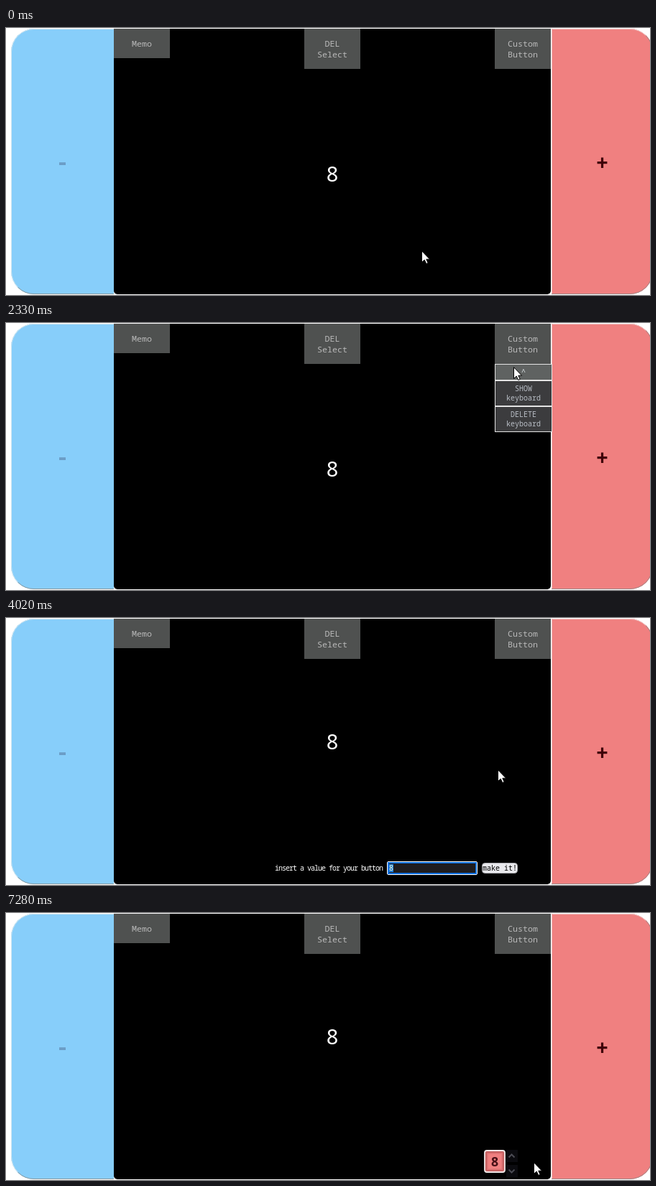
An HTML page that plays this animation: 896 by 372 pixels, repeating every 8 s.

```html
<!DOCTYPE html>
<html lang="en">
<head>
<meta charset="utf-8">
<title>Counter</title>
<style>
  html, body { margin: 0; width: 100%; height: 100%; overflow: hidden; background: #fff; }
  svg { display: block; width: 100vw; height: 100vh; }
  text { font: 10px "Noto Sans Mono", "DejaVu Sans Mono", monospace; text-anchor: middle; white-space: pre; }
  .tab rect { fill: #4f5150; }
  .tab text { font-size: 11.67px; fill: #bababa; }
  .menu rect { fill: #3c3c3e; stroke: #e4e4e4; }
  .menu text { fill: #b9bec6; }
  .menu #newBox.on { fill: #5f6261; }
  #newText { fill: #9dbacb; }
  #newText.on { fill: #dde3e6; }
  #count { font-size: 29.3px; fill: #fff; }
  .sign { font-size: 30px; font-weight: 700; }
  .label { text-anchor: start; letter-spacing: -1px; fill: #fff; }
  .value { text-anchor: start; fill: #fff8c4; }
  #make { fill: #e9e9ed; stroke: #a9a9ae; }
  #make.on { fill: #d0d0d7; }
  .close rect { fill: #202020; }
  .close text { fill: #fff; }
  .close.on text { fill: #f08080; }
  .key text { font-size: 18.5px; font-weight: 600; fill: #7a1420; }
  .key .shade { fill: none; stroke: #400; stroke-opacity: .22; }
  .key.calm text { fill: #481016; }
  .key.calm .shade { stroke-opacity: .12; }
  .arrows rect { fill: #0b0b0f; }
  .arrows path { fill: none; stroke: #4b4b53; stroke-width: 2; }
</style>
</head>
<body>
<svg viewBox="0 0 896 372" preserveAspectRatio="none">
  <defs>
    <g id="pill">
      <rect x="720" y="326" width="38" height="45" rx="17"/>
      <text x="739" y="352">x</text>
    </g>
  </defs>

  <path d="M150 1H39A32 32 0 0 0 7 33V339A32 32 0 0 0 39 371H150Z" fill="#87cefa"/>
  <path d="M150 1.5H39A31.5 31.5 0 0 0 7.5 33V339A31.5 31.5 0 0 0 16.7 361.3" fill="none" stroke="#d3e6ef"/>
  <path d="M16.7 361.3A31.5 31.5 0 0 0 39 370.5H150" fill="none" stroke="#87999f"/>
  <text class="sign" x="78.5" y="196.5" fill="#6b9dc6">-</text>

  <path d="M759 1H868A32 32 0 0 1 900 33V339A32 32 0 0 1 868 371H759Z" fill="#f08080"/>
  <path d="M759.5 371V1.5H868A31.5 31.5 0 0 1 890.3 10.7" fill="none" stroke="#efc4c4"/>
  <path d="M890.3 10.7A31.5 31.5 0 0 1 899.5 33V339A31.5 31.5 0 0 1 868 370.5H759" fill="none" stroke="#a08585"/>
  <text class="sign" x="829.5" y="199" fill="#400008">+</text>

  <rect x="150" y="1" width="608" height="370" rx="5"/>
  <g class="tab">
    <rect x="150" y="1" width="78" height="41"/>
    <text x="189" y="26">Memo</text>
    <rect x="415" y="1" width="78" height="56"/>
    <text x="454" y="26">DEL</text>
    <text x="454" y="41">Select</text>
    <rect x="680" y="1" width="78" height="56"/>
    <text x="719" y="26">Custom</text>
    <text x="719" y="41">Button</text>
  </g>

  <text id="count" x="454" y="213.5">8</text>

  <g id="menu" class="menu">
    <rect id="newBox" x="680.5" y="57.5" width="79" height="22"/>
    <text id="newText" x="720" y="72">NEW BUTTON</text>
    <rect x="680.5" y="80.5" width="79" height="35"/>
    <text x="720" y="95">SHOW</text>
    <text x="720" y="108">keyboard</text>
    <rect x="680.5" y="116.5" width="79" height="35"/>
    <text x="720" y="131">DELETE</text>
    <text x="720" y="144">keyboard</text>
  </g>

  <g id="form">
    <text class="label" x="374" y="352">insert a value for your button</text>
    <rect x="532.5" y="341.5" width="121" height="14" fill="#1e1c1e" stroke="#eee"/>
    <g id="focus">
      <rect x="530.5" y="339.5" width="125" height="18" rx="1.5" fill="#1e1c1e" stroke="#fff"/>
      <rect x="532" y="341" width="122" height="15" fill="none" stroke="#1070e0" stroke-width="2"/>
      <rect x="533" y="343" width="6" height="11" fill="#1b7fdc"/>
    </g>
    <text class="value" x="533" y="352">8</text>
    <rect id="make" x="662.5" y="341.5" width="49" height="14" rx="4"/>
    <text x="687" y="352">make it!</text>
    <g class="close"><use href="#pill"/></g>
  </g>

  <g id="row">
    <g id="key" class="key">
      <rect x="666" y="331" width="28" height="30" rx="3" fill="#f08080"/>
      <rect class="shade" x="668" y="333" width="24" height="26" rx="2" stroke-width="5"/>
      <rect class="shade" x="667.5" y="332.5" width="25" height="27" rx="2" stroke-width="3"/>
      <rect x="666" y="331" width="28" height="30" rx="3" fill="none" stroke="#f1e8e8" stroke-width="1.8"/>
      <text x="680" y="353">8</text>
    </g>
    <g class="arrows">
      <rect x="696" y="330" width="16" height="17"/>
      <rect x="696" y="351" width="16" height="17"/>
      <path d="M699.5 340.5L703.5 336.5L707.5 340.5M699.5 357.5L703.5 361.5L707.5 357.5"/>
    </g>
    <g id="rowClose" class="close"><use href="#pill"/></g>
  </g>

  <path id="cursor" d="M.5 .7V16.5L4.2 13L6.8 18.5L9.2 17.4L6.8 12.2H11.6Z" fill="#fff" stroke="#000"/>
</svg>
<script>
const LOOP = 8000, TICK = 70;
const $ = id => document.getElementById(id);
const easeIn = p => p * p;
const easeOut = p => p * (2 - p);
const easeBoth = p => p * p * (3 - 2 * p);

// start time, ticks, target x, target y, easing
const moves = [
  [810, 12, 706, 44, easeBoth],
  [1910, 9, 706, 64, easeBoth],
  [3670, 6, 684, 211, easeIn],
  [4090, 6, 670, 334, easeOut],
  [4520, 7, 671, 345, easeOut],
  [6790, 8, 734, 347, easeBoth]
];

function pointer(t) {
  let x = 578, y = 310;
  for (const [start, ticks, toX, toY, ease] of moves) {
    if (t < start) break;
    const p = ease(Math.min(1, (Math.floor((t - start) / TICK) + 1) / ticks));
    x += (toX - x) * p;
    y += (toY - y) * p;
  }
  return [Math.round(x), Math.round(y)];
}

const show = (id, on) => $(id).style.display = on ? "" : "none";
const mark = (id, on) => $(id).classList.toggle("on", on);

function draw(t) {
  const [x, y] = pointer(t);
  const formOpen = t >= 2940 && t < 7280;
  const made = t >= 4940;
  const closed = t >= 7280;
  const overNew = x > 680 && y > 57 && y < 80;

  $("cursor").setAttribute("transform", `translate(${x} ${y})`);
  show("menu", x >= 680 && y < (t < 1910 ? 57 : 152));
  mark("newBox", overNew);
  mark("newText", overNew);
  $("newText").textContent = overNew ? "^" : "NEW BUTTON";

  show("form", formOpen);
  show("focus", t < 4870);
  mark("make", x >= 662 && x < 712 && y > 340);

  show("row", made);
  $("row").setAttribute("transform", `translate(0 ${closed ? 0 : -61})`);
  $("key").classList.toggle("calm", closed);
  mark("rowClose", closed);

  const rows = formOpen + made;
  $("count").setAttribute("y", 213.5 - 30.5 * rows);
}

const begin = performance.now();
function frame() {
  draw((performance.now() - begin + 1) % LOOP);
  requestAnimationFrame(frame);
}
frame();
</script>
</body>
</html>
```
